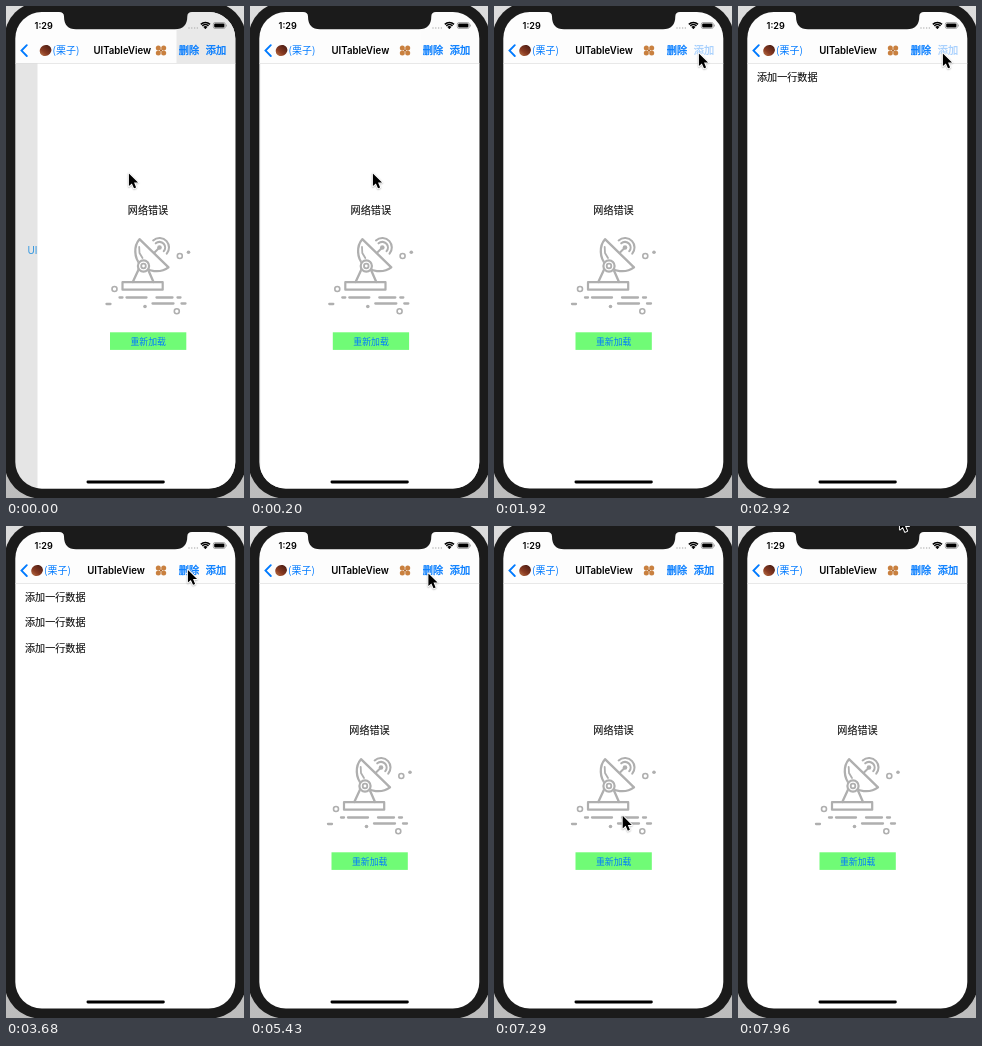
An HTML page with a canvas for the animation above (7990 ms loop, 238x492 px).

```html
<!DOCTYPE html>
<html lang="zh">
<head>
<meta charset="utf-8">
<title>UITableView</title>
<style>
html, body { margin: 0; width: 100%; height: 100%; overflow: hidden; background: #ddd; }
canvas { display: block; width: 238px; height: 492px; }
</style>
</head>
<body>
<canvas id="stage"></canvas>
<script>
const LOOP = 7990, W = 238, H = 492;
const BLUE = '#007aff', GRAY = '#afafaf', INK = '#1b1b1b';
const CJK = '"Noto Sans CJK SC", "Noto Sans CJK", sans-serif';
const LATIN = 'Inter, Roboto, sans-serif';
const canvas = document.getElementById('stage');
const c = canvas.getContext('2d');
const dpr = window.devicePixelRatio || 1;
canvas.width = W * dpr;
canvas.height = H * dpr;

// pointer tip: time, x, y
const track = [
  [0, 122, 166], [410, 122, 166], [590, 124, 246], [750, 132, 173], [1020, 181.5, 33],
  [1230, 181.5, 33], [1500, 202, 50], [1690, 204, 46],
  [3330, 204, 46], [3590, 182.5, 43], [3660, 182.5, 43], [3680, 181, 42.5], [3730, 178.5, 45],
  [5400, 178.5, 45], [5430, 177.5, 46], [5990, 126, 337],
  [7090, 126, 337], [7700, 133, 146], [7725, 133, 146], [7790, 161, -9.5],
  [7940, 161, -9.5], [7960, 161, -10.5], [LOOP, 161, -10.5]
];
const addPress = [[1920, 2130], [2830, 2930], [3080, 3180]];
const cutPress = [[3910, 4020], [4330, 4440], [4720, 4830]];
const loadPress = [[6910, 7030]];
const FADE = 230;

const clamp = v => Math.max(0, Math.min(1, v));
const ease = v => v * v * (3 - 2 * v);
const ramp = (t, from) => ease(clamp((t - from) / FADE));
const held = (t, list) => list.some(([a, b]) => t >= a && t < b);

function pointerAt(t) {
  let i = 1;
  while (i < track.length - 1 && track[i][0] <= t) i++;
  const [a, b] = [track[i - 1], track[i]];
  const k = ease(clamp((t - a[0]) / (b[0] - a[0])));
  return [a[1] + (b[1] - a[1]) * k, a[2] + (b[2] - a[2]) * k];
}

function text(s, x, y, size, color, { font = CJK, weight = 400, align = 'left', bold = 0 } = {}) {
  c.font = `${weight} ${size}px ${font}`;
  c.textAlign = align;
  c.fillStyle = c.strokeStyle = color;
  c.fillText(s, x, y);
  if (bold) {
    c.lineWidth = bold;
    c.strokeText(s, x, y);
  }
}

function rect(x, y, w, h, color) {
  c.fillStyle = color;
  c.fillRect(x, y, w, h);
}

function round(x, y, w, h, r, color) {
  c.beginPath();
  c.roundRect(x, y, w, h, r);
  c.fillStyle = color;
  c.fill();
}

function line(points, color, width) {
  c.beginPath();
  points.forEach(([x, y]) => c.lineTo(x, y));
  c.strokeStyle = color;
  c.lineWidth = width;
  c.stroke();
}

function ring(x, y, r, width = 1.6, from = 0, to = Math.PI * 2) {
  c.beginPath();
  c.arc(x, y, r, from, to);
  c.strokeStyle = GRAY;
  c.lineWidth = width;
  c.stroke();
}

function dot(x, y, r, color) {
  c.beginPath();
  c.arc(x, y, r, 0, Math.PI * 2);
  c.fillStyle = color;
  c.fill();
}

function withAlpha(a, draw) {
  c.save();
  c.globalAlpha *= a;
  draw();
  c.restore();
}

function drawDish() {
  c.lineCap = c.lineJoin = 'round';
  c.strokeStyle = GRAY;
  c.lineWidth = 2.2;
  c.strokeRect(94, 276.2, 40.2, 7.5);
  line([[110.3, 263], [104.3, 276]], GRAY, 2.3);
  line([[119.3, 263], [125, 276]], GRAY, 2.3);
  // bowl
  c.beginPath();
  c.moveTo(111, 233.2);
  c.bezierCurveTo(105, 240, 105.5, 252, 112, 258.5);
  c.bezierCurveTo(119, 266, 132, 267.5, 140, 261.3);
  c.closePath();
  c.fillStyle = '#fff';
  c.fill();
  c.lineWidth = 2.3;
  c.stroke();
  line([[110.7, 241], [111, 247], [114, 252]], GRAY, 1.8);
  line([[125.5, 247], [131, 241.5]], GRAY, 2);
  dot(115, 260, 6.4, '#fff');
  ring(115, 260, 5.6, 2.2);
  ring(115, 260, 2.3, 1.8);
  // signal
  dot(131, 241.5, 2.3, GRAY);
  ring(131, 241.5, 5.6, 2.1, -2.3, .7);
  ring(131, 241.5, 9.5, 2.1, -2.3, .7);
  // debris and ground
  ring(151.3, 250, 2.5);
  ring(86, 283, 2.5);
  ring(148.3, 305.3, 2.5);
  dot(160, 246.2, 1.8, GRAY);
  dot(116.5, 300.5, 1.8, GRAY);
  [[91, 94, 291.5], [98, 118, 291.5], [128, 144, 291.5], [149, 152, 291.5],
   [78, 82, 298], [124, 145, 297.5], [153, 157, 297.5]]
    .forEach(([a, b, y]) => line([[a, y], [b, y]], GRAY, 2.3));
  c.lineCap = 'butt';
  c.lineJoin = 'miter';
}

function drawEmpty(t) {
  text('网络错误', 119.5, 208, 10.1, '#111', { align: 'center', bold: .12 });
  drawDish();
  rect(81.5, 326.3, 76.3, 17.6, '#70fb76');
  withAlpha(held(t, loadPress) ? .25 : 1, () =>
    text('重新加载', 119.7, 338.6, 8.9, BLUE, { align: 'center' }));
}

function drawBody(t, slide) {
  const empty = t < addPress[0][1] ? 1 : ramp(t, cutPress[2][1]);
  if (slide > 0) {
    rect(9, 57, 221, 427, '#e5e5e5');
    text('UICollectionView', 21.5 + (22.5 - slide) * .3, 248, 9.8, '#2f95e0', { font: LATIN });
  }
  c.save();
  c.translate(slide, 0);
  rect(9, 57, 221, 427, '#fff');
  if (empty > 0) withAlpha(empty, () => drawEmpty(t));
  for (let i = 0; i < 3; i++) {
    const a = ramp(t, addPress[i][1]) * (1 - ramp(t, cutPress[2 - i][1]));
    if (a > 0) withAlpha(a, () =>
      text('添加一行数据', 19, 74.6 + i * 25.8, 10.1, '#111', { bold: .12 }));
  }
  c.restore();
}

function drawChestnut(x, y) {
  const g = c.createLinearGradient(x - 4, y + 5, x + 4, y - 5);
  g.addColorStop(0, '#b06a42');
  g.addColorStop(.35, '#8a3b22');
  g.addColorStop(1, '#4c1d14');
  c.beginPath();
  c.ellipse(x, y, 6, 5.4, -.5, 0, Math.PI * 2);
  c.fillStyle = g;
  c.fill();
}

function drawBar(t, slide) {
  const k = slide / 22.5;
  rect(9, 5, 221, 52, '#fdfdfd');
  if (k > 0) withAlpha(k, () => rect(170.5, 5, 59.5, 52, '#e9e9e9'));
  rect(9, 57, 221, .7, '#dedede');
  c.lineCap = 'round';
  line([[20.8, 39.2], [15.5, 44.6], [20.8, 50]], BLUE, 1.9);
  c.lineCap = 'butt';
  drawChestnut(31 + 8.5 * k, 44.5);
  text('(栗子)', 38.1 + 8.5 * k, 48.3, 10, BLUE);
  text('UITableView', 110 + 6.3 * k, 48.2, 9.65, '#000', { font: LATIN, weight: 600, align: 'center' });
  for (const sx of [-1, 1]) for (const sy of [-1, 1]) {
    dot(155 + sx * 2.7, 44.5 + sy * 2.5, 2.5, '#c9803f');
  }
  rect(154, 43.5, 2, 2, '#b06c35');
  withAlpha(held(t, cutPress) ? .25 : 1, () => text('删除', 172.8, 48.3, 10.2, BLUE, { bold: .35 }));
  withAlpha(held(t, addPress) ? .25 : 1, () => text('添加', 199.7, 48.3, 10.2, BLUE, { bold: .35 }));
}

function drawStatus() {
  text('1:29', 28.6, 22.8, 9.1, '#000', { font: LATIN, weight: 600 });
  for (let i = 0; i < 4; i++) dot(183 + i * 2.8, 22, .75, '#b5b5b5');
  // wifi
  for (const r of [2.2, 4.4, 6.5]) {
    c.beginPath();
    c.arc(199.4, 23, r, -Math.PI * .75, -Math.PI * .25);
    c.strokeStyle = '#000';
    c.lineWidth = 1.5;
    c.stroke();
  }
  dot(199.4, 22, .9, '#000');
  // battery
  c.beginPath();
  c.roundRect(207.3, 16.5, 12, 6, 1.7);
  c.strokeStyle = '#8d8d8d';
  c.lineWidth = .7;
  c.stroke();
  round(208.2, 17.4, 10.2, 4.2, 1, '#000');
  rect(220.2, 18.6, .7, 1.9, '#8d8d8d');
}

function drawNotch() {
  c.beginPath();
  c.moveTo(53, 4);
  c.lineTo(53, 6);
  c.quadraticCurveTo(58, 6, 58, 10.5);
  c.bezierCurveTo(58, 19, 62, 23.3, 70, 23.3);
  c.lineTo(169, 23.3);
  c.bezierCurveTo(177, 23.3, 181.3, 19, 181.3, 10.5);
  c.quadraticCurveTo(181.3, 6, 186, 6);
  c.lineTo(186, 4);
  c.fillStyle = INK;
  c.fill();
}

function drawPointer([x, y]) {
  c.save();
  c.translate(x + .9, y + 1.4);
  c.scale(.87, .87);
  c.beginPath();
  [[0, 0], [0, 14.6], [3.4, 11.5], [5.9, 17.2], [8.3, 16.1], [5.9, 10.6], [10.5, 10.5]]
    .forEach(([px, py]) => c.lineTo(px, py));
  c.closePath();
  c.shadowColor = 'rgba(0,0,0,.3)';
  c.shadowBlur = 1.5 * dpr;
  c.shadowOffsetY = .6 * dpr;
  c.strokeStyle = '#fff';
  c.lineWidth = 2.2;
  c.lineJoin = 'round';
  c.stroke();
  c.shadowColor = 'transparent';
  c.fillStyle = '#000';
  c.fill();
  c.restore();
}

function drawCase() {
  const g = c.createLinearGradient(0, 0, 0, H);
  g.addColorStop(0, '#dcdcdc');
  g.addColorStop(1, '#bcbcbc');
  rect(0, 0, W, H, g);
  round(-1.5, -4, 241.5, 496.5, 36, INK);
}

function draw(t) {
  const slide = t < 30 ? 22.5 : t < 260 ? 22.5 * Math.exp(-(t - 30) / 60) : 0;
  c.setTransform(dpr, 0, 0, dpr, 0, 0);
  drawCase();
  c.save();
  c.beginPath();
  c.roundRect(9.3, 6, 220, 476.4, 26.5);
  c.clip();
  drawBody(t, slide);
  drawBar(t, slide);
  drawStatus();
  drawNotch();
  round(80.5, 474.6, 78.3, 2.8, 1.4, '#000');
  c.restore();
  drawPointer(pointerAt(t));
}

const start = performance.now();
function tick() {
  draw((performance.now() - start) % LOOP);
  requestAnimationFrame(tick);
}
tick();
</script>
</body>
</html>
```
